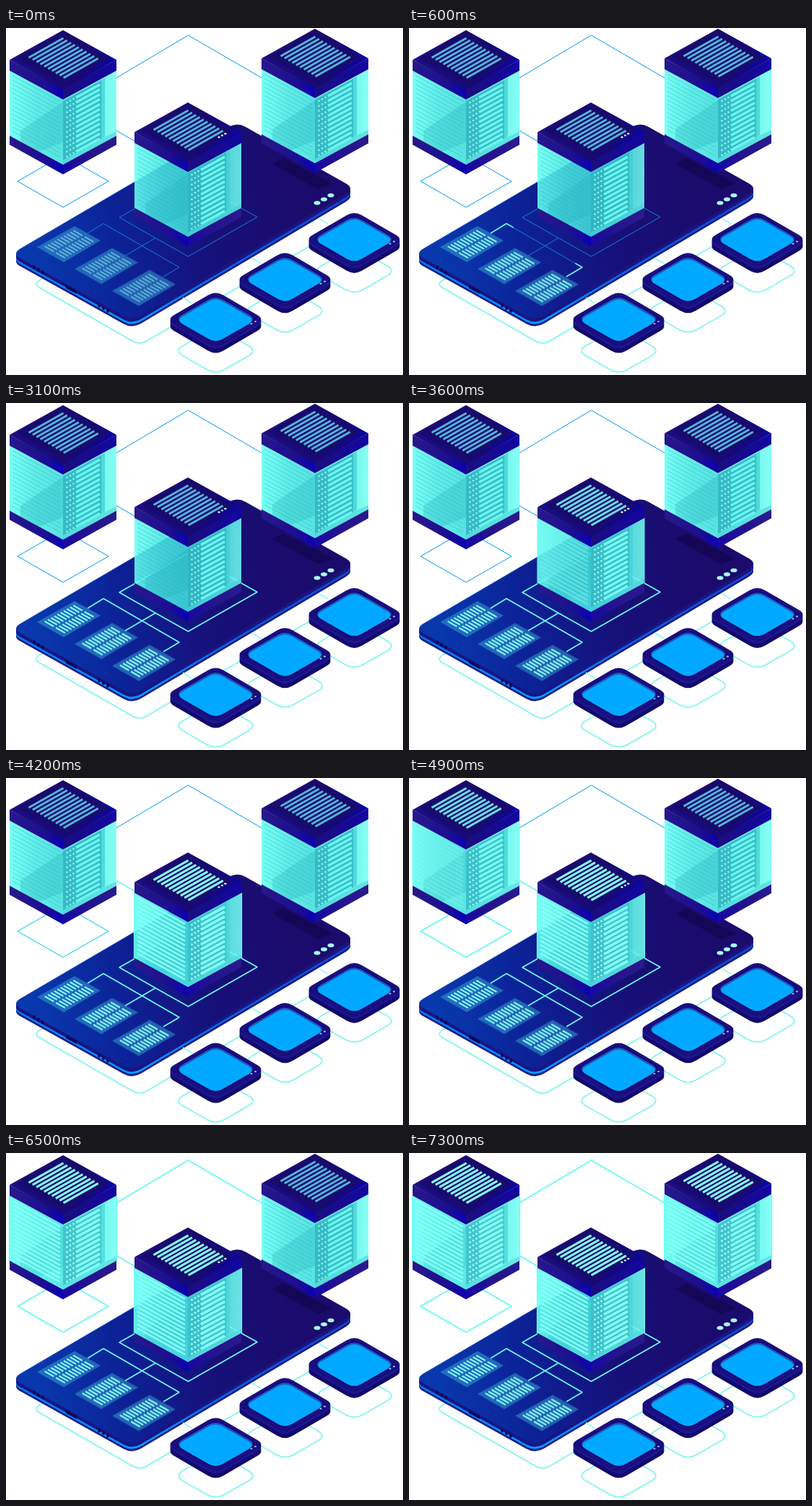
Animation, 550 px wide and 480 px high, one loop 9.3 s. Source, as an HTML page:

```html
<!DOCTYPE html>
<html lang="en">
<head>
<meta charset="utf-8">
<title>Isometric server network</title>
<style>
html, body { margin: 0; width: 100%; height: 100%; overflow: hidden; background: #fff; }
svg { display: block; width: 550px; height: 480px; }
path, ellipse { stroke-linejoin: round; }
.line { fill: none; }
</style>
</head>
<body>
<svg id="stage" viewBox="0 0 550 480" xmlns="http://www.w3.org/2000/svg">
  <defs>
    <linearGradient id="screen" gradientUnits="userSpaceOnUse" x1="40" y1="290" x2="400" y2="240">
      <stop offset="0" stop-color="#0838ac"/><stop offset=".3" stop-color="#0c2398"/>
      <stop offset=".65" stop-color="#16107a"/><stop offset="1" stop-color="#1b0b6c"/>
    </linearGradient>
    <linearGradient id="rim" gradientUnits="userSpaceOnUse" x1="15" y1="0" x2="477" y2="0">
      <stop offset="0" stop-color="#0878e8"/><stop offset=".38" stop-color="#00a0ff"/>
      <stop offset=".6" stop-color="#0a68e0"/><stop offset="1" stop-color="#1646c0"/>
    </linearGradient>
    <linearGradient id="capTop" x1="0" y1="0" x2="1" y2="0">
      <stop offset="0" stop-color="#1d0f80"/><stop offset=".6" stop-color="#170a6a"/><stop offset="1" stop-color="#0c04a4"/>
    </linearGradient>
    <linearGradient id="capLeft" x1="0" y1="0" x2="1" y2="0">
      <stop offset="0" stop-color="#27188c"/><stop offset=".65" stop-color="#1c0f90"/><stop offset="1" stop-color="#0a00b4"/>
    </linearGradient>
    <linearGradient id="capRight" x1="0" y1="0" x2="1" y2="0">
      <stop offset="0" stop-color="#1b0e80"/><stop offset="1" stop-color="#1206a0"/>
    </linearGradient>
    <linearGradient id="baseRight" x1="0" y1="0" x2="1" y2="0">
      <stop offset="0" stop-color="#1608a4"/><stop offset=".5" stop-color="#24148c"/><stop offset="1" stop-color="#2a1a8e"/>
    </linearGradient>
    <linearGradient id="glassLeft" x1="0" y1="0" x2="1" y2="0">
      <stop offset="0" stop-color="#66fff4"/><stop offset=".5" stop-color="#4ae9e4"/><stop offset="1" stop-color="#40dedd"/>
    </linearGradient>
    <linearGradient id="glassRight" x1="0" y1="0" x2="1" y2="0">
      <stop offset="0" stop-color="#48e0e0"/><stop offset=".7" stop-color="#5cf3ea"/><stop offset="1" stop-color="#72fff2"/>
    </linearGradient>
  </defs>
</svg>
<script>
const LOOP = 9300, SLOPE = .545;
const MINT = '#6efcf2', GLOW = '#84fff6', WIRE = '#0098f4';
const stage = document.getElementById('stage');
const sheet = document.head.appendChild(document.createElement('style'));

function add(parent, tag, attrs = {}) {
  const el = document.createElementNS(stage.namespaceURI, tag);
  for (const key in attrs) el.setAttribute(key, attrs[key]);
  return parent.appendChild(el);
}
const poly = pts => 'M' + pts.map(p => p.join(' ')).join('L') + 'Z';
const fill = (g, d, color, opacity = 1) => add(g, 'path', { d, fill: color, opacity });
const line = (g, d, color, width) =>
  add(g, 'path', { d, class: 'line', stroke: color, 'stroke-width': width });
const group = (parent, x, y) => add(parent, 'g', { transform: `translate(${x} ${y})` });

// Closed shape with every corner cut back by r and curved
function rounded(pts, r) {
  const toward = (a, b) => {
    const k = r / Math.hypot(b[0] - a[0], b[1] - a[1]);
    return [a[0] + (b[0] - a[0]) * k, a[1] + (b[1] - a[1]) * k];
  };
  return pts.map((p, i) => {
    const before = toward(p, pts[(i + pts.length - 1) % pts.length]);
    const after = toward(p, pts[(i + 1) % pts.length]);
    return `${i ? 'L' : 'M'}${before} Q${p} ${after}`;
  }).join('') + 'Z';
}
const rhomb = (x, y, w, h) => [[x, y - h], [x + w, y], [x, y + h], [x - w, y]];

// Keyframes that change one property between two moments of the loop
function phase(name, from, to, prop, a, b) {
  const pct = t => (t / LOOP * 100).toFixed(3) + '%';
  const steps = Math.round((to - from) / 100);
  sheet.textContent += `@keyframes ${name} {
    0% { ${prop}: ${a} }
    ${pct(from)} { ${prop}: ${a}; animation-timing-function: steps(${steps}, end) }
    ${pct(to)}, 100% { ${prop}: ${b} } }
  .${name} { animation: ${name} ${LOOP}ms linear infinite; }\n`;
}
const fade = (name, from, to) => phase(name, from, to, 'opacity', 0, 1);
function draw(name, from, to) {
  phase(name, from, to, 'stroke-dashoffset', 1, 0);
  sheet.textContent += `.${name} { stroke-dasharray: 1 2; }\n`;
}

fade('panels', 100, 700);
draw('bus', 300, 1000);
draw('branch', 1000, 1900);
draw('ring', 1900, 2900);
fade('core', 3200, 4000);
fade('link', 3700, 4200);
fade('pad', 3800, 4700);
fade('west', 4500, 5300);
fade('bridge', 5500, 6400);
fade('east', 6500, 7300);

function wire(d, name) {
  line(stage, d, WIRE, 1);
  line(stage, d, MINT, 1.5).classList.add(name);
}

function trace(d, name) {
  const el = line(stage, d, MINT, 1.6);
  el.setAttribute('pathLength', 1);
  el.classList.add(name);
}

function vents(g, color) {
  let d = '';
  for (let i = 0; i < 10; i++) d += `M${31.5 + i * 5.35} ${41 + i * 3.1}l48 -27`;
  line(g, d, color, 2.9);
}

function shelves(g, color, width) {
  let d = '';
  for (let i = 0; i < 14; i++) d += `M9 ${66 + i * 5.9}L75 ${66 + i * 5.9 + 66 * SLOPE}`;
  return line(g, d, color, width);
}

function rack(g, bar, dot) {
  let bars = '', dots = '';
  for (let i = 0; i < 12; i++) {
    const at = x => `${x} ${(106 + i * 6.8 - (x - 79) * SLOPE).toFixed(1)}`;
    bars += `M${at(97)}L${at(130)}`;
    for (const x of [83.5, 88, 92.5]) dots += `M${at(x)}L${at(x + 2)}`;
  }
  line(g, bars, bar, 3.4);
  line(g, dots, dot, 2.2);
}

function server(x, y, name, lamps) {
  const g = group(stage, x, y);
  const left = poly([[5, 59], [79, 99], [79, 189], [5, 149]]);
  const right = poly([[79, 99], [153, 59], [153, 149], [79, 189]]);
  fill(g, left, 'url(#glassLeft)', .88);
  fill(g, right, 'url(#glassRight)', .86);
  fill(g, poly([[20, 142], [79, 102], [79, 158], [46, 171], [20, 157]]), '#23adb8', .28);
  shelves(g, '#27b4bf', .8).setAttribute('opacity', .6);
  fill(g, poly([[79, 101], [132, 72], [132, 153], [79, 183]]), '#2fb4c0', .85);
  fill(g, poly([[132, 72], [137, 69], [137, 150], [132, 153]]), '#3bcfd2', .7);
  fill(g, poly([[79, 183], [132, 153], [153, 143], [153, 149], [79, 189]]), '#42cfd4', .55);
  rack(g, '#6af5ef', '#8ffaf5');

  const lit = add(g, 'g', { class: name });
  fill(lit, left, '#66fff2', .25);
  fill(lit, right, '#7afff4', .16);
  shelves(lit, '#86fff5', 2.6);
  rack(lit, '#83fff5', '#a4fffa');
  line(lit, 'M4.5 59V149L79 189L153.5 149V59', MINT, 1.2);

  fill(g, poly([[5, 149], [79, 189], [79, 202.5], [5, 161.5]]), 'url(#capLeft)');
  fill(g, poly([[79, 189], [153, 149], [153, 161.5], [79, 202.5]]), 'url(#baseRight)');
  fill(g, poly([[5, 44], [79, 84], [79, 99], [5, 59]]), 'url(#capLeft)');
  fill(g, poly([[79, 84], [153, 44], [153, 59], [79, 99]]), 'url(#capRight)');
  fill(g, poly([[79, 3], [153, 44], [79, 85], [5, 44]]), 'url(#capTop)');
  fill(g, poly([[79, 6], [143, 42], [79, 78], [15, 42]]), '#190b6c');
  line(g, 'M15 43L79 79L143 43', '#1408a0', 1.2);
  vents(g, '#52b5dc');

  const top = add(g, 'g', { class: name });
  vents(top, GLOW);
  if (lamps) for (let i = 0; i < 3; i++)
    add(g, 'ellipse', { cx: 122 + i * 4.4, cy: 51 - i * 2.4, rx: 1.7, ry: 1.2, fill: '#c8fbff' });
}

function panel(x, y) {
  const g = group(stage, x, y);
  fill(g, poly([[95, 274], [131, 294], [80, 324], [43, 303]]), '#38a2d4', .52);
  const at = (u, v) => `${(43 + 52 * u + 37 * v).toFixed(1)} ${(303 - 29 * u + 21 * v).toFixed(1)}`;
  let d = '';
  for (let i = 0; i < 10; i++) {
    const u = .12 + i * .0845;
    d += `M${at(u, .12)}L${at(u, .46)}M${at(u, .54)}L${at(u, .88)}`;
  }
  line(g, d, '#66bad8', 1.8);
  line(g, d, GLOW, 2).classList.add('panels');
}

function slab(g, d, depth, color) {
  for (let y = depth; y > 0; y--)
    fill(g, d, color(y)).setAttribute('transform', `translate(0 ${y})`);
}

function device(x, y) {
  const g = group(stage, x, y);
  const body = rounded(rhomb(290.5, 403, 68, 39.5), 12);
  slab(g, body, 10, d => d > 4 ? '#130a6c' : '#1b168e');
  fill(g, body, '#170c78');
  line(g, rounded(rhomb(290.5, 403, 64, 37), 12), '#20129a', 1);
  fill(g, rounded(rhomb(290.5, 402.5, 56.5, 32.5), 12), '#1c58bc');
  fill(g, rounded(rhomb(290.5, 404.2, 55, 31.5), 11), '#00a8ff');
  for (const [cx, cy] of [[340, 409], [345.5, 406]])
    add(g, 'ellipse', { cx, cy, rx: 1.6, ry: 1.1, fill: '#9cc0f0' });
}

function phone() {
  const body = rounded([[320, 130], [483, 222], [175, 405], [8, 312]], 14);
  slab(stage, body, 11, d => d > 8 ? '#141a8c' : d > 5 ? 'url(#rim)' : '#1a1584');
  fill(stage, body, 'url(#screen)');
  line(stage, 'M23 304L308 137', '#1650c4', .8);
  fill(stage, poly([[369, 188], [384, 180], [453, 215], [432, 223]]), '#140752', .8);
  for (const [cx, cy] of [[431, 242], [440.5, 237], [450, 231.5]])
    add(stage, 'ellipse', { cx, cy, rx: 4.5, ry: 2.7, fill: '#a8fbf8' });
  for (const [x, y] of [[39, 331], [129, 384]])
    for (let i = 0; i < 3; i++)
      add(stage, 'ellipse', { cx: x + i * 6, cy: y + i * 3.6, rx: 1.8, ry: 2.7, fill: '#10085c' });
  fill(stage, poly([[83, 355], [98, 363.5], [98, 368], [83, 360]]), '#10085c');
}

const devices = [[0, 0], [96, -55.3], [192, -110.6]];

// Wires behind everything
wire('M57 188.5L16 212L79 248L142 212L101 188.5', 'pad');
wire('M153 69L252.5 10L354 69', 'bridge');
wire('M153 142L179 157', 'link');
line(stage, 'M52 346Q36 353 46 359L175 433Q185 439 195 433L236 409', '#7ff5ec', 1.6);
for (const [x, y] of devices)
  line(group(stage, x, y), rounded(rhomb(290.5, 446.5, 57.5, 33), 14), '#7ff5ec', 1.6);
line(stage, 'M300 371L330 354M396 316L426 299', '#7ff5ec', 1.5);

phone();
for (let i = 0; i < 3; i++) panel(i * 52, i * 30.3);

// Circuit on the phone screen: dim tracks, then the light running along them
const bus = ['M113 284L135 270.5L187.5 300.8', 'M218 344L240 331L187.5 300.8'];
const branch = 'M165 315L207 290.5';
const ring = ['M207 290.5L157 262L252 208', 'M207 290.5L252.5 316L348 261.5L252 208'];
for (const d of [...bus, branch, ...ring]) line(stage, d, '#1880d2', 1);
for (const d of bus) trace(d, 'bus');
trace(branch, 'branch');
for (const d of ring) trace(d, 'ring');

line(stage, 'M245 373L258 381M340 318L354 326M434 264L446 271', '#9af8f4', 1.6);
server(0, 0, 'west');
server(349, -2, 'east');
server(173, 100, 'core', true);
for (const [x, y] of devices.slice().reverse()) device(x, y);
</script>
</body>
</html>
```
